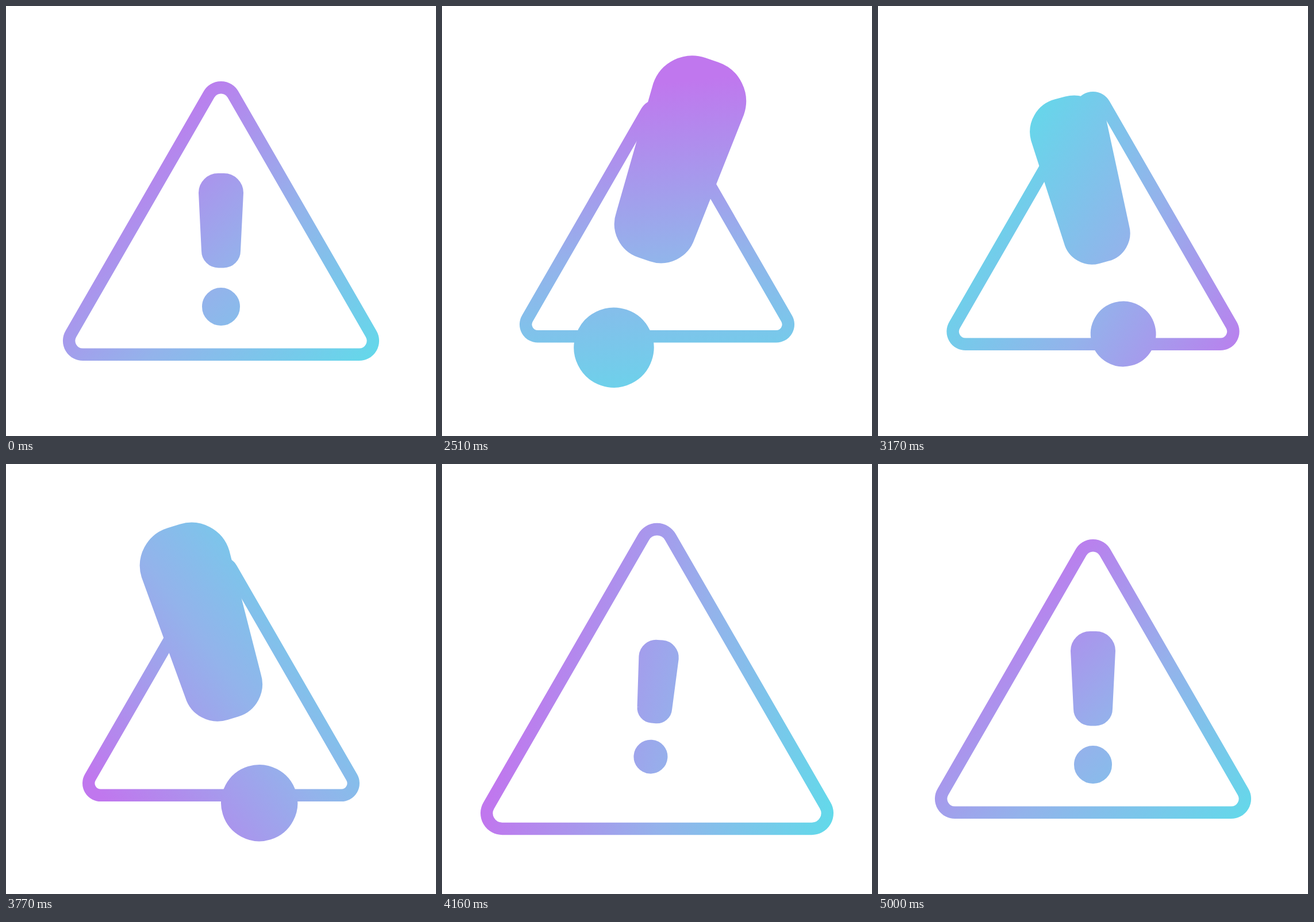
These frames come from a looping animation (748 px wide and 748 px high, 5030 ms). An HTML page:

```html
<!DOCTYPE html>
<html lang="en">
<head>
<meta charset="utf-8">
<title>Warning</title>
<style>
  html, body { margin: 0; width: 100%; height: 100%; overflow: hidden; background: #fff; }
  svg { display: block; width: 100vw; height: 100vh; }
</style>
</head>
<body>
<svg viewBox="0 0 748 748">
  <defs>
    <linearGradient id="tint" gradientUnits="userSpaceOnUse" x1="130" y1="430" x2="730" y2="430">
      <stop offset="0" stop-color="#c077ee"/>
      <stop offset=".5" stop-color="#93b3eb"/>
      <stop offset="1" stop-color="#60dbea"/>
    </linearGradient>
    <mask id="sign" maskUnits="userSpaceOnUse" x="0" y="0" width="748" height="748">
      <path id="triangle" fill="none" stroke="#fff"/>
      <g id="mark" fill="#fff" stroke="#fff">
        <path d="M-34-49A29 29 0 0 1-5-78H5A29 29 0 0 1 34-49L29 52A24.5 24.5 0 0 1 4.5 76.5H-4.5A24.5 24.5 0 0 1-29 52Z"/>
        <circle cy="149" r="28"/>
      </g>
    </mask>
  </defs>
  <rect width="748" height="748" fill="url(#tint)" mask="url(#sign)"/>
</svg>
<script>
const LOOP = 5030, REST = 2030, STEP = 30, CENTER = 374;
const [tint, triangle, mark] = ['tint', 'triangle', 'mark'].map(id => document.getElementById(id));

// Each track is a list of [time, value] keys, eased between neighbours.
const frameScale = [[2000, 1], [2400, .855], [2950, .947], [3590, .855], [3690, .855], [4200, 1.125], [4730, 1]];
const markScale = [[2000, 1], [2400, 2.37], [2950, 1.7], [3650, 2.37], [4200, .855], [4730, 1]];
const markAngle = [[2000, 0], [2400, 20], [3400, -20], [3650, -20], [4200, 5], [4730, 0]];

const ease = x => (1 - Math.cos(Math.PI * x)) / 2;

function sample(track, t) {
  const next = track.findIndex(([time]) => time > t);
  if (next === 0) return track[0][1];
  if (next < 0) return track[track.length - 1][1];
  const [t0, a] = track[next - 1], [t1, b] = track[next];
  return a + (b - a) * ease((t - t0) / (t1 - t0));
}

// Rounded triangle around the origin, built from its three corner circles.
function trianglePath(half, top, bottom, r) {
  const dx = r * Math.cos(Math.PI / 6), dy = r / 2;
  const x = half - r, low = bottom - r, high = top + r;
  const arc = (px, py) => `A${r} ${r} 0 0 1 ${px} ${py}`;
  return `M${-dx} ${high - dy}${arc(dx, high - dy)}L${x + dx} ${low - dy}${arc(x, bottom)}` +
    `H${-x}${arc(-x - dx, low - dy)}Z`;
}
triangle.setAttribute('d', trianglePath(264.3, -232.3, 232.3, 24));

function draw(t) {
  const size = sample(frameScale, t);
  triangle.setAttribute('transform', `translate(${CENTER} ${CENTER}) scale(${size})`);
  triangle.setAttribute('stroke-width', 21.5 / size);

  const zoom = sample(markScale, t);
  const lift = (1 - zoom) * (zoom > 1 ? 85 : 42);
  mark.setAttribute('transform',
    `translate(${CENTER} ${CENTER}) rotate(${sample(markAngle, t)}) translate(0 ${lift}) scale(${zoom})`);
  mark.setAttribute('stroke-width', 10 / zoom);

  const progress = Math.min(1, Math.max(0, (t - 2000) / 3000));
  const turn = 45 + 360 * ease(1 - (1 - progress) ** 1.3);
  tint.setAttribute('gradientTransform', `rotate(${turn} 430 430)`);
}

const start = performance.now();
function tick() {
  const t = (performance.now() - start) % LOOP;
  draw(t < REST ? 0 : REST + Math.floor((t - REST) / STEP) * STEP);
  requestAnimationFrame(tick);
}
tick();
</script>
</body>
</html>
```
